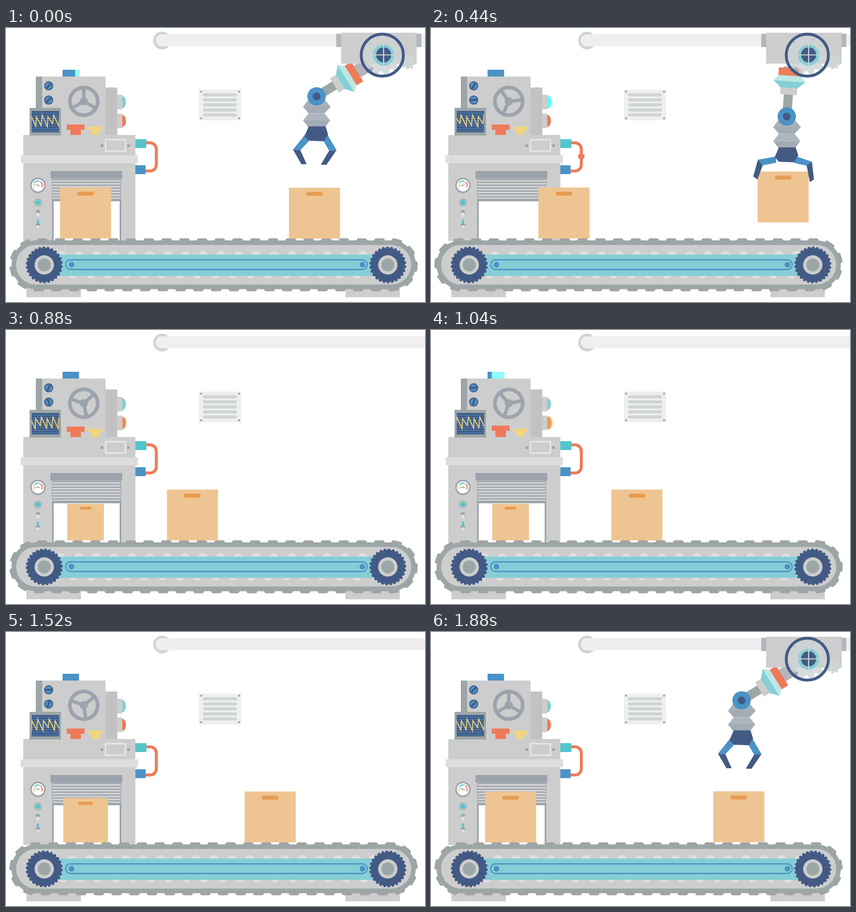
Write an HTML page with a canvas that moves like this. It is 800 by 525 pixels and loops after 1920 ms.

```html
<!DOCTYPE html>
<html lang="en">
<head>
<meta charset="utf-8">
<title>Packing line</title>
<style>
html, body { margin: 0; width: 100%; height: 100%; overflow: hidden; background: #fff; }
canvas { display: block; width: 800px; height: 525px; }
</style>
</head>
<body>
<canvas id="stage" width="800" height="525"></canvas>
<script>
const c = document.getElementById('stage').getContext('2d');
const LOOP = 1920, STEP = 40, TAU = Math.PI * 2, DEG = Math.PI / 180;
const GREY = '#cdcdcd', STEEL = '#9ca6a6', SLATE = '#9ca3ad', PALE = '#efefef', MIST = '#ced5d3',
  NAVY = '#435a85', BLUE = '#4a93c6', CYAN = '#86ced6', TEAL = '#52c6cc', RED = '#ef7a59',
  YELLOW = '#f0d57c', CARD = '#eec592', AMBER = '#e79c52', LILAC = '#b4b5bd';

const clamp = x => Math.max(0, Math.min(1, x));
const mix = (a, b, p) => a + (b - a) * p;
const smooth = x => { x = clamp(x); return x < .5 ? 2 * x * x : 1 - 2 * (1 - x) * (1 - x); };
const span = (t, a, b) => smooth((t - a) / (b - a));
const bell = (t, mid, half) => Math.pow(Math.cos(clamp(Math.abs(t - mid) / half) * Math.PI / 2), 2);

function keyed(t, keys) {
  let i = 0;
  while (i < keys.length - 2 && t > keys[i + 1][0]) i++;
  const [a, x] = keys[i], [b, y] = keys[i + 1];
  return mix(x, y, clamp((t - a) / (b - a)));
}

// Rectangle given by its edges
function rect(x0, y0, x1, y1, color) {
  c.fillStyle = color;
  c.fillRect(x0, y0, x1 - x0, y1 - y0);
}
function disc(x, y, r, color, ry = r) {
  c.fillStyle = color;
  c.beginPath();
  c.ellipse(x, y, r, ry, 0, 0, TAU);
  c.fill();
}
function ring(x, y, r, w, color, a = 0, b = TAU) {
  c.strokeStyle = color;
  c.lineWidth = w;
  c.beginPath();
  c.arc(x, y, r, a, b);
  c.stroke();
}
function line(x0, y0, x1, y1, w, color, cap = 'butt') {
  c.strokeStyle = color;
  c.lineWidth = w;
  c.lineCap = cap;
  c.beginPath();
  c.moveTo(x0, y0);
  c.lineTo(x1, y1);
  c.stroke();
  c.lineCap = 'butt';
}
function poly(pts, color) {
  c.fillStyle = color;
  c.beginPath();
  for (let i = 0; i < pts.length; i += 2) c.lineTo(pts[i], pts[i + 1]);
  c.fill();
}
function round(x0, y0, x1, y1, r) {
  c.beginPath();
  c.roundRect(x0, y0, x1 - x0, y1 - y0, r);
}
function at(x, y, angle, draw) {
  c.save();
  c.translate(x, y);
  c.rotate(angle);
  draw();
  c.restore();
}
function cog(x, y, inner, outer, teeth, angle, color) {
  const pitch = TAU / teeth;
  c.fillStyle = color;
  c.beginPath();
  for (let i = 0; i < teeth; i++) {
    [[0, inner], [.22, outer], [.62, outer], [.82, inner]].forEach(([f, r]) => {
      const a = angle + (i + f) * pitch;
      c.lineTo(x + r * Math.cos(a), y + r * Math.sin(a));
    });
  }
  c.fill();
}

function rail() {
  c.save();
  c.beginPath();
  c.rect(270, 0, 42, 50);
  c.clip();
  disc(298, 24, 17, MIST);
  c.restore();
  c.fillStyle = PALE;
  round(286, 12, 830, 35, 11.5);
  c.fill();
}

function vent() {
  rect(368, 118, 449, 177, PALE);
  for (const x of [372.5, 445]) for (const y of [122, 173]) disc(x, y, 2.1, SLATE);
  for (let i = 0; i < 5; i++) line(379, 128 + i * 9.65, 438, 128 + i * 9.65, 6, MIST, 'round');
}

function screw(x, y, deg) {
  disc(x, y, 8.7, NAVY);
  disc(x, y, 6.8, BLUE);
  at(x, y, deg * DEG, () => line(-6.5, 0, 6.5, 0, 3.6, NAVY));
}

function lamp(y, color, lit, glow, strength) {
  rect(212, y - 14, 222, y + 14, GREY);
  c.save();
  c.beginPath();
  c.rect(222, y - 20, 30, 40);
  c.clip();
  disc(222, y, 7.2, color, 11.5);
  c.globalAlpha = strength * .7;
  disc(225, y, 8, glow, 13.5);
  c.globalAlpha = strength;
  disc(224, y, 6.2, lit, 11.5);
  c.restore();
}

function monitor(t) {
  rect(45, 153, 105, 206, STEEL);
  rect(49, 159, 101.5, 200, NAVY);
  c.save();
  c.beginPath();
  c.rect(49, 159, 52.5, 41);
  c.clip();
  for (let y = 163; y < 200; y += 4.9) line(49, y, 102, y, 1, BLUE);
  c.strokeStyle = YELLOW;
  c.lineWidth = 1.8;
  c.beginPath();
  const wave = [57, 188, 58, 170, 67, 187, 69, 167, 79, 189, 80, 170, 89, 183, 91, 167];
  const shift = 44 * t / 1880;
  for (let k = -2; k < 2; k++)
    for (let i = 0; i < wave.length; i += 2) c.lineTo(wave[i] + shift + k * 44, wave[i + 1]);
  c.stroke();
  c.restore();
}

function handwheel(t) {
  at(148.5, 140.5, t / 1880 * TAU, () => {
    ring(0, 0, 26.6, 7, SLATE);
    for (let i = 0; i < 3; i++) {
      const a = -Math.PI / 2 + i * TAU / 3;
      line(0, 0, 25 * Math.cos(a), 25 * Math.sin(a), 6.5, SLATE);
    }
    disc(0, 0, 7.8, SLATE);
  });
}

function pipe(t) {
  c.strokeStyle = RED;
  c.lineWidth = 5.6;
  c.beginPath();
  c.moveTo(262, 220);
  c.arcTo(287, 220, 287, 232, 12);
  c.arcTo(287, 274, 275, 274, 12);
  c.lineTo(262, 274);
  c.stroke();
  // Ball runs through the pipe from the upper to the lower socket
  const s = -8 + .11 * t, bend = 11 * Math.PI / 2;
  let x = 268 + s, y = 220, a;
  if (s > 8) { a = Math.min(1, (s - 8) / bend) * Math.PI / 2; x = 276 + 11 * Math.sin(a); y = 231 - 11 * Math.cos(a); }
  if (s > 8 + bend) y = Math.min(263, 231 + s - 8 - bend);
  if (s > 40 + bend) { a = Math.min(1, (s - 40 - bend) / bend) * Math.PI / 2; x = 276 + 11 * Math.cos(a); y = 263 + 11 * Math.sin(a); }
  if (s > 40 + 2 * bend) x = 276 - (s - 40 - 2 * bend);
  if (x > 254) disc(x, y, 6.2, RED);
  rect(247, 213, 268, 230, TEAL);
  rect(247, 263, 266.5, 280, BLUE);
}

function gauge(t) {
  disc(61, 301.5, 14.7, SLATE);
  disc(61, 301.5, 11.8, '#fff');
  ring(61, 301.5, 8.3, 2, YELLOW, 2.5, 3.7);
  ring(61, 301.5, 8.3, 2, TEAL, 3.8, 5.1);
  ring(61, 301.5, 8.3, 2, RED, 5.3, 6.8);
  const tilt = keyed(t, [[0, 20], [200, 0], [440, -5], [720, 0], [1040, 0], [1520, 10], [1880, 20]]);
  at(61, 301.5, tilt * DEG, () => {
    line(-6, 0, 4, 0, 1.3, STEEL);
    disc(0, 0, 1.5, STEEL);
  });
}

function machine(t) {
  rect(108, 80, 139.5, 94, BLUE);
  const left = 140 - .2 * ((t + 40) % 960);
  const a = Math.max(108, left), b = Math.min(139.5, left + 24);
  if (b > a) rect(a, 80, b, 93, '#8ffdff');

  rect(57, 93, 70, 205, STEEL);
  rect(69, 93, 190, 206, GREY);
  rect(190, 114, 212.5, 205, '#c2c2c2');
  lamp(142, CYAN, '#5cf8fc', '#b5fbfd', t < 480 ? bell(t, 480, 180) : bell(t, 480, 400));
  lamp(178, RED, AMBER, '#f0d29c', bell(t, 1040, 240));
  screw(81.5, 110.8, 135 + 720 * t / 1880);
  screw(81.5, 138, keyed(t, [[0, 135], [200, 210], [440, 350], [720, 405], [1040, 460], [1520, 650], [1880, 855]]));
  handwheel(t);
  const u = t % 960, lift = u < 400 ? -3 * Math.sin(Math.PI * u / 400) : 0;
  rect(116, 185 + lift, 150, 195 + lift, RED);
  rect(123, 194 + lift, 143, 206, RED);
  rect(157, 189, 184, 195, YELLOW);
  rect(161.5, 195, 180, 198.5, YELLOW);
  rect(164, 198, 177.5, 206, YELLOW);

  pipe(t);
  rect(33, 205, 247, 408, GREY);
  monitor(t);
  rect(28, 244, 252, 259, '#dddddd');
  c.strokeStyle = '#e8e8ec';
  c.lineWidth = 2.6;
  c.strokeRect(190, 214, 38, 22);
  disc(183, 225.3, 2.8, SLATE);
  disc(234, 225.3, 2.8, SLATE);

  rect(88, 288, 220, 408, SLATE);
  rect(91, 332, 217, 408, '#fff');
  rect(89, 288, 219, 328, '#d5d5d5');
  for (let i = 0; i < 7; i++) rect(89, 289 + i * 5.55, 219, 291.4 + i * 5.55, SLATE);
  rect(89, 327.3, 219, 332, STEEL);
  rect(85, 274, 222, 288.5, SLATE);

  gauge(t);
  disc(61, 334.3, 7.3, STEEL);
  disc(61, 334.3, 5.6, '#cfe3e3');
  disc(61, 334.3, 4.8, TEAL);
  rect(58.5, 353, 63.5, 361, '#e4e4e4');
  rect(57, 350, 65, 354, STEEL);
  rect(59, 348.5, 63, 350, TEAL);
  rect(58.5, 378, 63.5, 383, '#e4e4e4');
  rect(59, 367, 63, 376, TEAL);
  rect(56.5, 375, 65.5, 378.6, STEEL);
}

// Carton with its centre at x, y
function carton(x, y, size, angle = 0) {
  at(x, y, angle, () => {
    const k = size / 97.5;
    c.scale(k, k);
    rect(-48.75, -48.75, 48.75, 48.75, CARD);
    c.fillStyle = AMBER;
    round(-16, -40.8, 16, -33.2, 3.8);
    c.fill();
  });
}

// Point on the belt loop, s measured from the start of the top run
function belt(s, r) {
  const R = 48.6, x0 = 57.5, x1 = 735, run = x1 - x0, arc = Math.PI * R, y = 453.7;
  const total = 2 * (run + arc);
  s = ((s % total) + total) % total;
  if (s < run) return [x0 + s, y - r, 0];
  if (s < run + arc) {
    const a = (s - run) / R;
    return [x1 + r * Math.sin(a), y - r * Math.cos(a), a];
  }
  if (s < 2 * run + arc) return [x1 - (s - run - arc), y + r, Math.PI];
  const a = Math.PI + (s - 2 * run - arc) / R;
  return [x0 + r * Math.sin(a), y - r * Math.cos(a), a];
}

function conveyor(t) {
  rect(39, 498, 143, 516, GREY);
  rect(648, 498, 752, 516, GREY);
  const pitch = 2 * (677.5 + Math.PI * 48.6) / 49, start = 171 - 57.5 + .192 * t;
  for (let i = 0; i < 49; i++) {
    const [x, y, a] = belt(start + i * pitch, 46);
    at(x, y, a, () => {
      c.fillStyle = '#a3a3a3';
      c.beginPath();
      c.moveTo(-10, 3);
      c.lineTo(-10, -1.5);
      c.quadraticCurveTo(-9.5, -4.8, -6, -4.8);
      c.lineTo(6, -4.8);
      c.quadraticCurveTo(9.5, -4.8, 10, -1.5);
      c.lineTo(10, 3);
      c.fill();
    });
  }
  c.fillStyle = GREY;
  c.strokeStyle = STEEL;
  c.lineWidth = 8.8;
  round(15, 411.3, 778, 496, 42.3);
  c.fill();
  c.stroke();
  for (let i = 0; i < 49; i++) {
    const [x, y, a] = belt(start + 2 + i * pitch, 17.5);
    if ((a === 0 || a === Math.PI) && x > 85 && x < 715) disc(x, y, 9, '#dedede');
  }
  rect(90, 434, 712, 475, CYAN);
  c.strokeStyle = BLUE;
  c.lineWidth = 2.4;
  round(114, 444.2, 689.7, 462.7, 9.2);
  c.stroke();
  for (const x of [125, 680.5]) disc(x, 453.5, 5.4, BLUE);
  for (const x of [73, 729]) {
    cog(x, 454, 32.5, 35.3, 26, .192 * t / 48.6, NAVY);
    disc(x, 454, 18.5, GREY);
    disc(x, 454, 12.4, STEEL);
  }
}

// Finger quads relative to the elbow: folded, then spread
const FINGERS = [
  [BLUE, [-21, 72, -45, 102, -31, 103, -15, 86], [-21, 75, -55, 81, -47, 92, -20, 87]],
  [NAVY, [-45, 102, -31, 103, -19, 130, -29, 130], [-55, 81, -46, 92, -56, 119, -64, 113]],
  [BLUE, [20, 72, 38, 103, 24, 104, 13, 85], [19, 75, 48, 85, 40, 93, 13, 87]],
  [NAVY, [38, 103, 24, 104, 8, 131, 19, 131], [48, 85, 38, 93, 44, 124, 52, 119]]
];

function arm(x, y, tilt, ext, stretch, spread) {
  const shoulder = Math.hypot(694 - x, 79 - y);
  at(x, y, tilt * DEG, () => {
    rect(-13, -Math.max(95, shoulder + 4), 13, -88 - ext, LILAC);
    rect(-8.7, -44 - ext, 8.7, 0, STEEL);
    c.translate(0, -ext);
    rect(-16, -53, 16, -40, GREY);
    poly([-16, -53, 16, -53, 30.5, -66, -30.5, -66], CYAN);
    poly([-30.5, -66, 30.5, -66, 21, -77, -21, -77], '#bde7e5');
    rect(-22, -91, 22, -76.5, RED);
  });
  c.save();
  c.translate(x, y);
  c.save();
  c.scale(1, stretch);
  poly([-17, 8, 17, 8, 27, 20, -26, 20], '#a9b1b7');
  poly([-26, 20, 27, 20, 15, 32.5, -15, 32.5], '#a3abb4');
  poly([-15, 32.5, 15, 32.5, 26, 46, -26, 46], '#aeb6bd');
  poly([-26, 46, 26, 46, 16, 59, -16, 59], '#a3abb4');
  c.restore();
  const drop = 86 * (stretch - 1);
  c.translate(0, drop);
  for (const [color, a, b] of FINGERS) poly(a.map((v, i) => mix(v, b[i], spread)), color);
  poly([-15, 57.5, 17, 57.5, 22, 73, 14, 86, -15, 85, -23, 76], NAVY);
  c.restore();
  disc(x, y, 17.6, BLUE);
  disc(x, y, 7.4, NAVY);
}

function trolley(roll) {
  rect(630.5, 11, 640, 36.5, LILAC);
  rect(784, 11, 793, 36.5, LILAC);
  rect(640, 9, 784, 68.3, GREY);
  cog(768, 65, 11, 14.5, 9, -roll * 2.6, MIST);
  disc(694, 79, 7.2, '#a6a7b2');
  c.globalAlpha = .82;
  cog(718.5, 52, 31, 38.5, 11, roll + 1.68, MIST);
  c.globalAlpha = 1;
  ring(718.5, 52, 40.3, 5.4, NAVY);
  disc(721, 52, 20.2, CYAN);
  disc(721, 51.5, 14.4, NAVY);
  at(721, 51.5, roll, () => {
    line(-20, 0, 20, 0, 2.2, MIST);
    line(0, -20, 0, 20, 2.2, MIST);
  });
}

function scene(t) {
  c.clearRect(0, 0, 800, 525);
  rect(0, 0, 800, 525, '#fff');
  rail();
  vent();
  machine(t);

  const drop = span(t, 0, 200), lift = span(t, 200, 640);
  const away = t < 1300 ? 260 * span(t, 560, 1060) : 260 * (1 - span(t, 1520, 1840));

  // New carton pops up, then swells to full size
  if (t > 520) {
    const pop = span(t, 520, 760), size = mix(70, 97.5, span(t, 1160, 1840));
    carton(152, t < 1160 ? 368 : 403.3 - size / 2, size * pop, -90 * DEG * (1 - pop));
  }
  if (t < 1880) carton(151.9 + .2319 * t, 354.4, 97.5);
  else carton(539 + 48.75, 354, 97.5);
  conveyor(t);

  c.save();
  c.translate(away, 0);
  if (t < 1200) {
    const bx = t < 200 ? 540.2 + .25 * t : mix(590.2, 647, lift);
    carton(bx + 48.75, mix(306, 253, lift) + 48.75, 97.5);
    arm(mix(mix(593, 647, drop), 702, lift), mix(mix(131, 196, drop), 151, lift),
      mix(mix(58.5, 19, drop), -6, lift), 4.5 * drop * (1 - lift),
      1 + .045 * drop * (1 - lift), drop);
  } else {
    arm(593, 131, 58.5, 0, 1, 0);
  }
  trolley(away / 53 * 30 * DEG);
  c.restore();
}

const begin = performance.now();
function tick(now) {
  const t = Math.max(0, now - begin) % LOOP;
  scene(Math.floor(t / STEP) * STEP);
  requestAnimationFrame(tick);
}
scene(0);
requestAnimationFrame(tick);
</script>
</body>
</html>
```
